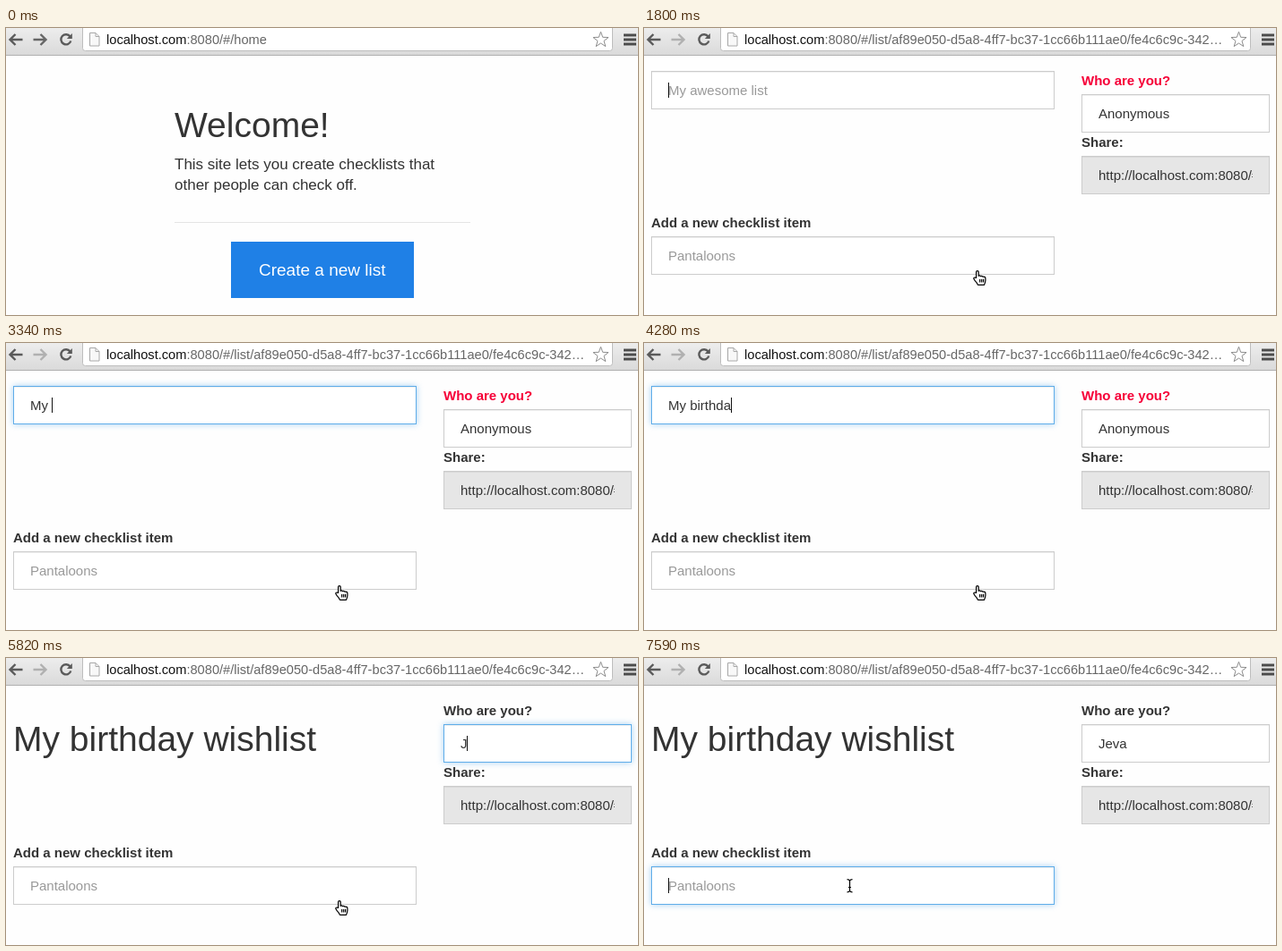
An HTML page for the animation above (8000 ms loop, 705 by 321 pixels).

```html
<!DOCTYPE html>
<html lang="en">
<head>
<meta charset="utf-8">
<title>Checklist demo</title>
<style>
  html, body { margin: 0; width: 100%; height: 100%; overflow: hidden; background: #fefefe; }
  svg { display: block; }
  text { font: 15px "Liberation Sans", Arial, sans-serif; fill: #333; white-space: pre; }
  .url { font-size: 14.63px; fill: #666; }
  .url .host { fill: #111; }
  .h1 { font-size: 39px; }
  .lead { font-size: 17px; }
  .btn { font-size: 19px; fill: #fff; }
  .label { font-weight: bold; }
  .hint { fill: #999; }
  .box { fill: #fff; stroke: #ccc; }
  .shade { stroke: #000; stroke-opacity: .06; }
  .glow { fill: #66afe9; filter: blur(3.5px); }
  .edge { fill: none; stroke: #5fade9; }
  .mark { fill: #b4d5fe; }
  .caret { fill: #111; }
  .icon { fill: none; stroke: #5a5a5a; stroke-width: 2.4; }
</style>
</head>
<body>
<svg id="stage" width="705" height="321" viewBox="0 0 705 321">
  <defs>
    <linearGradient id="bar" x2="0" y2="1">
      <stop offset="0" stop-color="#ededed"/>
      <stop offset="1" stop-color="#dadada"/>
    </linearGradient>
    <clipPath id="shareClip"><rect x="507" y="144" width="172" height="41"/></clipPath>
  </defs>
  <rect width="705" height="321" fill="#fefefe"/>

  <g id="toolbar">
    <rect width="705" height="30" fill="url(#bar)"/>
    <rect y="30" width="705" height="1" fill="#b0b0b0"/>
    <path d="M85.5 -2V22.500Q85.500 25.500 88.500 25.500H673.500Q676.500 25.500 676.500 22.500V-2Z" fill="#fff" stroke="#bdbdbd"/>
    <path class="icon" d="M18.500 13H5M10.500 7L4.500 13L10.500 19"/>
    <path class="icon" id="forward" d="M30.500 13H44M38.500 7L44.500 13L38.500 19"/>
    <path class="icon" stroke-width="2" d="M71.500 9.500A5.600 5.600 0 1 0 72.300 14.500"/>
    <path d="M73.800 6V12H67.800Z" fill="#5a5a5a"/>
    <path d="M93.500 5.500H100L104 9.500V20H93.500ZM100 5.500V9.500H104" fill="#f8f8f8" stroke="#a8a8a8"/>
    <path id="star" fill="#fff" stroke="#8c8c8c" stroke-linejoin="round"/>
    <path d="M689 8H703M689 13H703M689 18H703" stroke="#4c4c4c" stroke-width="3"/>
    <text class="url" x="112" y="18"><tspan class="host">localhost.com</tspan><tspan id="path"></tspan></text>
  </g>

  <g id="home">
    <text class="h1" x="188" y="122">Welcome!</text>
    <text class="lead" x="188" y="158">This site lets you create checklists that</text>
    <text class="lead" x="188" y="181">other people can check off.</text>
    <rect x="188" y="217" width="330" height="1" fill="#e4e4e4"/>
    <rect id="button" x="251" y="239" width="204" height="63"/>
    <text class="btn" x="282" y="277">Create a new list</text>
  </g>

  <g id="list">
    <text class="h1" id="heading" x="8" y="104">My birthday wishlist</text>
    <text class="label" id="whoLabel" x="488" y="64">Who are you?</text>
    <text class="label" x="488" y="133">Share:</text>
    <text class="label" x="8" y="223">Add a new checklist item</text>
  </g>

  <g stroke="#000" stroke-linejoin="round">
    <path id="hand" fill="#fff" stroke-width="1.2" d="M3.600 8.500V2Q3.600 .6 4.900 .6Q6.200 .6 6.200 2V6.300Q7.500 5.500 8.500 6.600Q9.900 5.900 10.900 7.200Q13.600 6.700 13.900 8.900V11.500Q13.800 13.500 12.400 16.400H5.500Q4.600 14 2.400 11.800L.9 9.700Q.5 7.900 2.200 8Z M7.700 10V13.500M9.700 10V13.500M11.600 10V13.500"/>
    <path id="arrow" fill="#000" stroke="#fff" d="M.5 .5V13L3.500 10.300L5.700 15.300L7.800 14.400L5.700 9.500H9.700Z"/>
    <path id="beam" fill="none" stroke-width="1.200" d="M.5 .6Q3 .6 3.500 2.200Q4 .6 6.500 .6M3.500 2V13.500M.5 14.900Q3 14.900 3.500 13.300Q4 14.900 6.500 14.900M2 9.500H5"/>
  </g>
</svg>
<script>
const LOOP = 8000;
const NS = "http://www.w3.org/2000/svg";
const $ = id => document.getElementById(id);

function add(parent, tag, attrs) {
  const el = document.createElementNS(NS, tag);
  for (const k in attrs) el.setAttribute(k, attrs[k]);
  return parent.appendChild(el);
}

const show = (el, on) => el.setAttribute("visibility", on ? "inherit" : "hidden");

// Text field: glow, frame, selection, text and caret
function makeField(x, y, w) {
  const g = add($("list"), "g", {});
  const frame = { x: x + .5, y: y + .5, width: w - 1, height: 42 };
  const glow = add(g, "rect", { class: "glow", x, y, width: w, height: 43 });
  const box = add(g, "rect", { class: "box", ...frame });
  add(g, "path", { class: "shade", d: `M${x + 1} ${y + 1.5}h${w - 2}` });
  const edge = add(g, "rect", { class: "edge", ...frame });
  const mark = add(g, "rect", { class: "mark", x: x + 19, y: y + 13, height: 17 });
  const text = add(g, "text", { x: x + 19, y: y + 27 });
  const caret = add(g, "rect", { class: "caret", y: y + 13, width: 1, height: 17 });
  return { g, box, text, set(value, hint, ring, hasCaret, selected) {
    const str = value || hint;
    if (text.textContent !== str) text.textContent = str;
    text.setAttribute("class", value ? "" : "hint");
    glow.setAttribute("opacity", ring * .6);
    edge.setAttribute("opacity", ring);
    const len = text.getComputedTextLength();
    mark.setAttribute("width", selected ? Math.min(len, w - 38) : 0);
    caret.setAttribute("x", Math.floor(x + 19 + (value ? len : 0)));
    show(caret, hasCaret);
  } };
}

const title = makeField(8, 48, 450);
const who = makeField(488, 74, 210);
const share = makeField(488, 143, 210);
const item = makeField(8, 233, 450);
share.box.style.fill = "#e6e6e6";
share.text.setAttribute("clip-path", "url(#shareClip)");

const LIST_PATH = ":8080/#/list/af89e050-d5a8-4ff7-bc37-1cc66b111ae0/fe4c6c9c-342";

const points = Array.from({ length: 10 }, (_, i) => {
  const a = i * Math.PI / 5, r = i % 2 ? 3.7 : 9;
  return `${663.5 + r * Math.sin(a)} ${13.3 - r * Math.cos(a)}`;
});
$("star").setAttribute("d", `M${points.join("L")}Z`);

const start = {
  page: "home", cursor: "", x: 0, y: 0, titleText: "", whoText: "Anonymous",
  titleRing: 0, whoRing: 0, shareRing: 0, itemRing: 0,
  caret: "", selected: "", done: false, red: true
};

// Each step changes part of the state from its time on
const steps = [
  [1320, { cursor: "hand", x: 380, y: 281 }],
  [1440, { x: 367, y: 271 }],
  [1800, { page: "list", caret: "title" }],
  [1920, { titleRing: .7 }],
  [2030, { titleRing: 1 }],
  [2510, { caret: "" }],
  [2980, { caret: "title" }],
  ...typing("titleText", "My birthday wishlist", [
    [3100, 1], [3220, 2], [3340, 3], [3450, 4], [3570, 5], [3810, 6],
    [4050, 7], [4170, 8], [4280, 10], [4400, 11], [4520, 12], [4630, 14],
    [4750, 16], [4990, 18], [5100, 20]
  ]),
  [5460, { done: true, caret: "", selected: "who", whoRing: .5 }],
  [5580, { whoRing: 1 }],
  [5820, { red: false, selected: "", caret: "who" }],
  ...typing("whoText", "Jeva", [[5820, 1], [6050, 2], [6170, 3], [6290, 4]]),
  [6770, { caret: "", selected: "share", whoRing: .5, shareRing: .5 }],
  [6890, { whoRing: 0, shareRing: 1, cursor: "arrow", x: 355, y: 294 }],
  [7000, { x: 310, y: 305 }],
  [7120, { x: 262, y: 288 }],
  [7240, { cursor: "beam", x: 226, y: 247 }],
  [7470, { selected: "", caret: "item", shareRing: .5, itemRing: .5 }],
  [7590, { shareRing: 0, itemRing: 1 }]
];

function typing(key, str, marks) {
  return marks.map(([time, n]) => [time, { [key]: str.slice(0, n) }]);
}

function stateAt(t) {
  const s = { ...start };
  for (const [time, change] of steps) if (time <= t) Object.assign(s, change);
  return s;
}

function draw(t) {
  const s = stateAt(t), home = s.page === "home";
  show($("home"), home);
  show($("list"), !home);
  show($("heading"), s.done);
  show(title.g, !home && !s.done);
  $("path").textContent = home ? ":8080/#/home" : LIST_PATH + "…";
  $("forward").style.stroke = home ? "#666" : "#b0b0b0";
  $("button").style.fill = s.cursor ? "#1166c2" : "#1f80e6";
  $("whoLabel").style.fill = s.red ? "#f60038" : "#333";

  const fill = (name, field, value, hint) =>
    field.set(value, hint, s[name + "Ring"], !home && s.caret === name && !s[name + "Hidden"], s.selected === name);
  fill("title", title, s.titleText, "My awesome list");
  if (s.done) show(title.g.lastChild, false);
  fill("who", who, s.whoText, "");
  fill("share", share, "http://localhost.com" + LIST_PATH, "");
  fill("item", item, "", "Pantaloons");

  for (const name of ["hand", "arrow", "beam"]) {
    show($(name), s.cursor === name);
    $(name).setAttribute("transform", `translate(${s.x} ${s.y})`);
  }
}

let last = -1;
function tick() {
  const t = performance.now() % LOOP;
  const count = steps.filter(([time]) => time <= t).length;
  if (count !== last) draw(t);
  last = count;
  requestAnimationFrame(tick);
}
draw(0);
tick();
</script>
</body>
</html>
```
